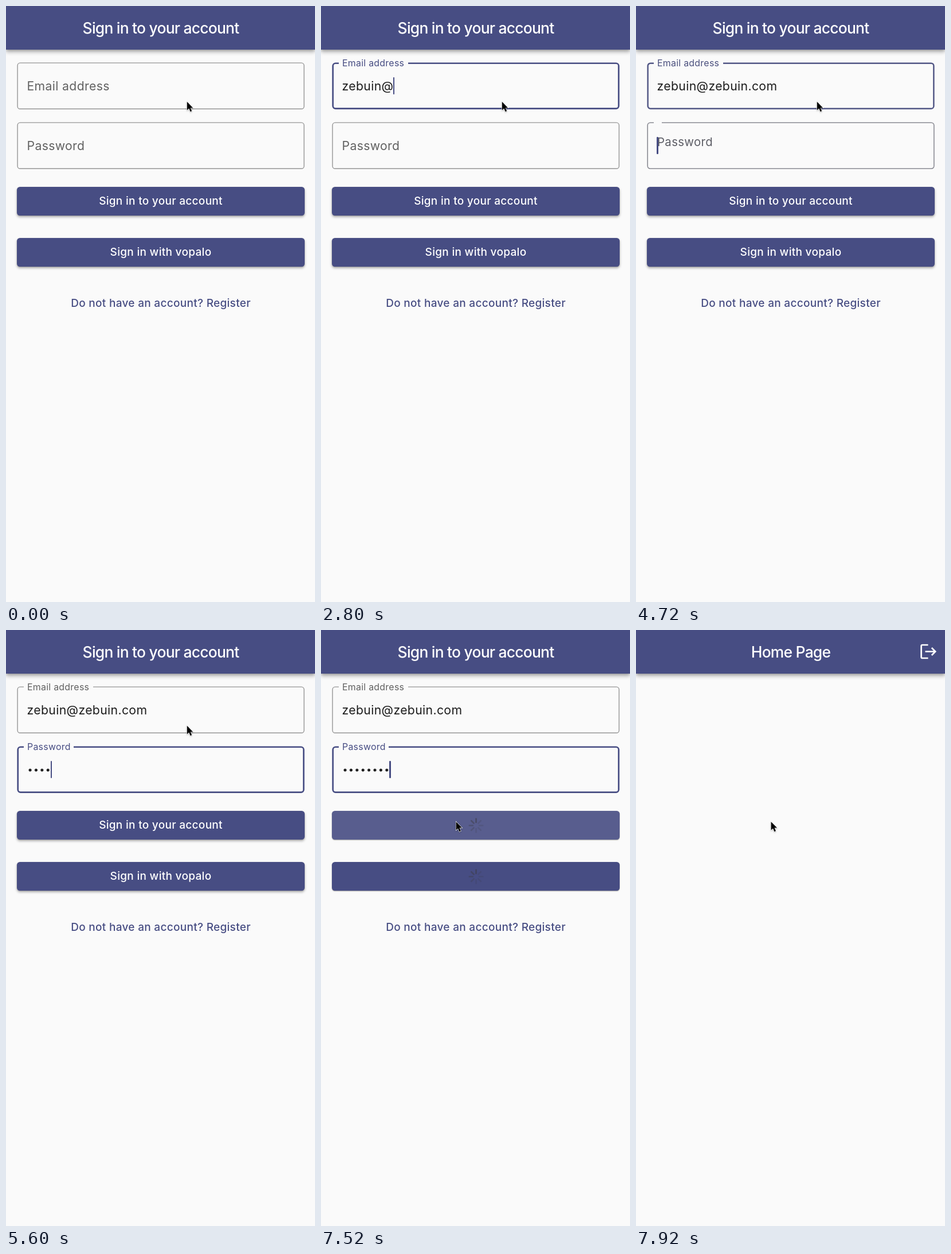
These frames come from a looping animation (539x1038 px, 8000 ms). An HTML page:

```html
<!DOCTYPE html>
<html lang="en">
<head>
<meta charset="utf-8">
<title>Sign in</title>
<style>
  :root { --main: #474d83; --page: #fafafa; }
  html, body { margin: 0; width: 100%; height: 100%; overflow: hidden; background: var(--page); }
  body { position: relative; font-family: Inter, Roboto, sans-serif; }
  div, span, svg { position: absolute; box-sizing: border-box; white-space: pre; }
  svg { overflow: visible; }
  .bar {
    left: 0; top: 0; width: 539px; height: 76px; background: var(--main);
    box-shadow: 0 4px 7px #0000004d, 0 1px 4px #0000002b;
  }
  .bar span {
    left: 0; top: 0; width: 540px; text-align: center; color: #fff;
    font-size: 26.4px; line-height: 76px; font-weight: 450; letter-spacing: -.75px;
  }
  .field { left: 19px; width: 502px; height: 82px; }
  .outline { left: 0; top: 0; fill: none; }
  .gap { left: 12px; top: -1px; height: 5px; background: var(--page); }
  .label, .value { left: 17.5px; font-size: 21.2px; line-height: 30px; letter-spacing: .36px; }
  .label { top: 26px; transform-origin: 0 50%; color: #616161; }
  .value { top: 26px; height: 30px; color: #1c1c1c; }
  .dots { background: radial-gradient(circle at 5px 16px, #1c1c1c 2.1px, #1c1c1c00 2.9px) 0 0 / 10.4px 30px; }
  .caret { left: 100%; top: 0; width: 2.6px; height: 30px; margin-left: -.6px; border-radius: 1.3px; background: var(--main); }
  .button {
    left: 19px; width: 502px; height: 50px; border-radius: 5.2px; background: var(--main);
    color: #fff; text-align: center; line-height: 50px;
  }
  .button, .link { font-size: 19px; font-weight: 500; letter-spacing: .3px; }
  .button span { inset: 0; }
  .button svg { left: 238px; top: 12px; }
  .link { left: 0; top: 503px; width: 540px; line-height: 30px; text-align: center; color: var(--main); }
</style>
</head>
<body>
<div id="login">
  <div class="link">Do not have an account? Register</div>
</div>
<div class="bar">
  <span id="title"></span>
  <svg id="logout" style="left:494px;top:22px" width="32" height="30" fill="none" stroke="#fff" stroke-width="2.7">
    <path d="M15.5 4H5.5Q3.6 4 3.6 6V25Q3.6 27 5.5 27H15.5M10.5 15.5H28M21.8 9L28.2 15.5L21.8 22"/>
  </svg>
</div>
<svg id="mouse" width="20" height="26" style="left:0;top:0;filter:drop-shadow(0 1px 1px #0004)">
  <path d="M0 0V14.6L3.4 11.5L5.8 17.2L8.3 16.1L5.9 10.6H10.4Z" stroke="#fff" stroke-width="1.2" paint-order="stroke"/>
</svg>
<script>
const LOOP = 8000, STEP = 80;
const EMAIL = 'zebuin@zebuin.com';
const EMAIL_KEYS = [1680, 1760, 1920, 2080, 2240, 2480, 2720, 3120, 3120, 3360, 3440, 3600, 3840, 4080, 4240, 4320, 4560];
const DOT_KEYS = [5280, 5360, 5520, 5600, 5920, 6000, 6240, 6480];
const EMAIL_FOCUS = 910, PASSWORD_FOCUS = 4670, LOADING = 7380, HOME = 7920;

const $ = id => document.getElementById(id);
const ramp = (t, from, length) => Math.min(1, Math.max(0, (t - from) / length));
const ease = x => x * x * (3 - 2 * x);
const mix = (a, b, x) => a + (b - a) * x;
const mixColor = (a, b, x) => `rgb(${a.map((v, i) => mix(v, b[i], x))})`;
const typed = (keys, t) => keys.filter(k => k <= t).length;

const GREY = [150, 150, 150], HOVER = [136, 136, 136], MAIN = [71, 77, 131], TEXT = [97, 97, 97];

function add(parent, className, text = '') {
  const el = document.createElement('div');
  el.className = className;
  el.textContent = text;
  return parent.appendChild(el);
}

function makeField(top, name, gapWidth) {
  const box = add($('login'), 'field');
  box.style.top = top + 'px';
  box.innerHTML = '<svg class="outline" width="502" height="82"><rect rx="4.6"/></svg>';
  const outline = box.querySelector('rect'), gap = add(box, 'gap');
  const label = add(box, 'label', name), value = add(box, 'value');
  const text = document.createElement('b');
  text.style.fontWeight = 400;
  value.append(text);
  const caret = add(value, 'caret');
  return { value, text, caret, draw(floated, focus, idle) {
    const stroke = mix(1.4, 2.7, focus), inset = .4 + stroke / 2;
    const shape = { x: inset, y: inset, width: 502 - 2 * inset, height: 82.4 - 2 * inset,
      stroke: mixColor(idle, MAIN, focus), 'stroke-width': stroke };
    for (const key in shape) outline.setAttribute(key, shape[key]);
    gap.style.width = gapWidth * floated + 'px';
    label.style.transform = `translateY(${mix(0, mix(-40.2, -39.6, focus), floated)}px) scale(${mix(1, .75, floated)})`;
    label.style.color = mixColor(TEXT, MAIN, focus);
  } };
}

function makeButton(top, name) {
  const box = add($('login'), 'button');
  box.style.top = top + 'px';
  const text = document.createElement('span');
  text.textContent = name;
  const ticks = Array.from({ length: 8 }, (_, i) =>
    `<rect x="-1.3" y="-13" width="2.6" height="8.7" rx="1.3" transform="rotate(${i * 45})"/>`).join('');
  box.innerHTML = `<svg width="27" height="27" viewBox="-13.5 -13.5 27 27" fill="#3c3c44">${ticks}</svg>`;
  box.append(text);
  const spinner = box.firstChild;
  return { box, draw(t) {
    const loading = t >= LOADING, lift = 1 - .8 * ramp(t, LOADING, 200);
    text.style.opacity = loading ? 0 : 1;
    spinner.style.opacity = loading ? 1 : 0;
    const active = Math.floor(Math.max(0, t - LOADING) / 125);
    [...spinner.children].forEach((tick, i) => {
      const age = (i - active + 80) % 8;
      tick.style.opacity = (47 + 25 * Math.max(0, age - 3)) / 255;
    });
    box.style.boxShadow = `0 ${2.4 * lift}px ${4 * lift}px #0000004d, 0 ${lift}px ${2 * lift}px #00000024`;
  } };
}

const email = makeField(98, 'Email address', 120.5);
const password = makeField(202, 'Password', 86.5);
password.value.classList.add('dots');
const signIn = makeButton(315, 'Sign in to your account');
const other = makeButton(404, 'Sign in with vopalo');

// Caret opacity for a blink that fades out, then back in
const blink = (t, out, back) => 1 - ramp(t, out, 200) + ramp(t, back, 200);

function draw(t) {
  const home = t >= HOME;
  $('login').style.display = home ? 'none' : '';
  $('logout').style.display = home ? '' : 'none';
  $('title').textContent = home ? 'Home Page' : 'Sign in to your account';

  const emailFloat = ease(ramp(t, EMAIL_FOCUS, 200));
  const passwordFloat = ease(ramp(t, PASSWORD_FOCUS, 200));
  email.draw(emailFloat, emailFloat - passwordFloat, t >= 800 && t < 4720 ? HOVER : GREY);
  password.draw(passwordFloat, passwordFloat, GREY);

  const letters = typed(EMAIL_KEYS, t), dots = typed(DOT_KEYS, t);
  email.text.textContent = EMAIL.slice(0, letters);
  email.caret.style.opacity = t < EMAIL_FOCUS || t >= PASSWORD_FOCUS ? 0 : letters ? 1 : blink(t, 1150, 1560);
  password.value.style.width = dots * 10.4 + 'px';
  password.caret.style.opacity = t < PASSWORD_FOCUS ? 0
    : dots < 8 ? (dots ? 1 : blink(t, 5150, 5400)) : blink(t, 6780, 7260);

  const move = ease(ramp(t, 6740, 400));
  $('mouse').style.transform = `translate(${mix(315.8, 235.6, move)}px, ${mix(166.8, 334, move)}px)`;
  signIn.box.style.backgroundColor = mixColor(MAIN, [255, 255, 255], .09 * ramp(t, 7060, 160));
  signIn.draw(t);
  other.draw(t);
}

let start;
function frame(now) {
  start ??= now;
  draw(Math.floor(((now - start) % LOOP + 2) / STEP) * STEP % LOOP);
  requestAnimationFrame(frame);
}
draw(0);
requestAnimationFrame(frame);
</script>
</body>
</html>
```
